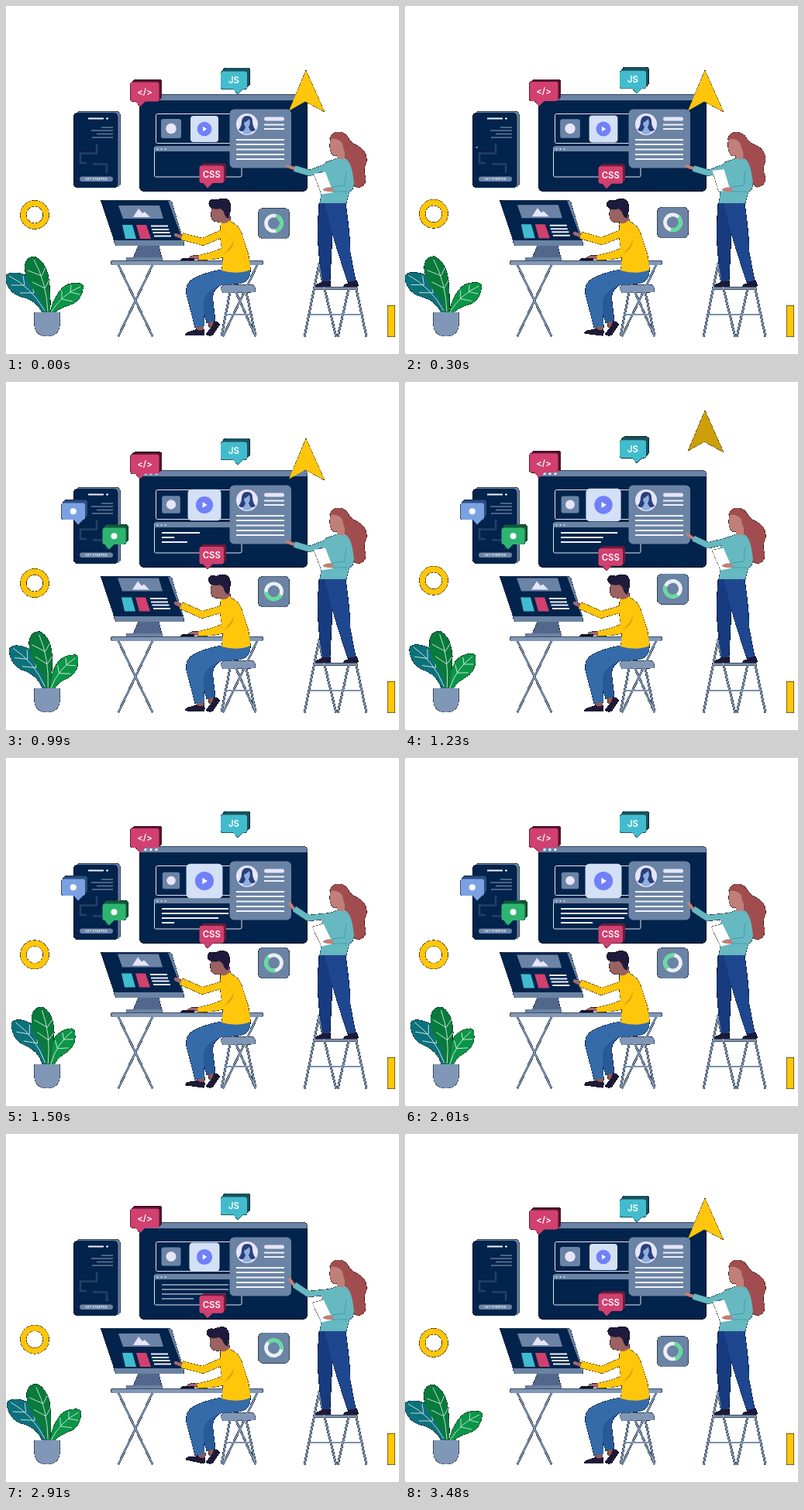
An HTML page for the animation above (3510 ms loop, 507x450 px).

```html
<!DOCTYPE html>
<html lang="en">
<head>
<meta charset="utf-8">
<title>Web design team</title>
<style>
  html, body { margin: 0; width: 100%; height: 100%; overflow: hidden; background: #fff; }
  svg { display: block; width: 507px; height: 450px; }
  path, line { stroke-linejoin: round; }
  text { font-family: Inter, "Open Sans", sans-serif; font-weight: 600; fill: #fff; text-anchor: middle; }
  .navy { fill: #02234b; } .slate { fill: #6b83a4; } .steel { fill: #8197b7; }
  .yellow { fill: #ffc60b; } .pale { fill: #e6e5fa; } .shoe { fill: #1e1839; }
  .bar { fill: none; stroke: #7c92b1; stroke-width: 2.2; }
  .thin { fill: none; stroke: #dfe6f4; stroke-width: 1; }
  .rows { fill: none; stroke: #f0f0fc; stroke-width: 2; }
  .vein { fill: none; stroke: #cfe9dc; stroke-width: .9; }
</style>
</head>
<body>
<svg viewBox="0 0 507 450">
  <defs>
    <!-- thin hard dark outline around every silhouette -->
    <filter id="edge" filterUnits="userSpaceOnUse" x="0" y="0" width="507" height="450" color-interpolation-filters="sRGB">
      <feGaussianBlur in="SourceAlpha" stdDeviation=".45"/>
      <feComponentTransfer result="matte"><feFuncA type="discrete" tableValues="0 1 1 1 1 1 1 1"/></feComponentTransfer>
      <feMerge><feMergeNode in="matte"/><feMergeNode in="SourceGraphic"/></feMerge>
    </filter>
  </defs>
  <g filter="url(#edge)">
    <!-- phone -->
    <rect class="slate" x="90" y="136.500" width="57.500" height="97.500" rx="5"/>
    <rect class="navy" x="87.500" y="138" width="57" height="97" rx="5"/>
    <path d="M106 145.500H126" class="rows"/><circle cx="130.500" cy="145.500" r="1.300" fill="#fff"/>
    <path d="M123 157H138M110 161H138M117 165.500H138M111 170H138" stroke="#60789a" stroke-width="1.600"/>
    <path d="M117 178V190.500H96V203H104M112 204.500H130V216" fill="none" stroke="#263f65" stroke-width="2.600"/>
    <rect class="slate" x="95" y="220.500" width="43" height="6.500" rx="3.200"/>
    <text x="116.500" y="225.300" font-size="3.900" letter-spacing=".15">GET STARTED</text>

    <!-- large screen -->
    <rect class="navy" x="172.500" y="114.500" width="216" height="125" rx="5"/>
    <path class="slate" d="M172.500 122V119Q172.500 114.500 177 114.500H384Q388.500 114.500 388.500 119V122Z"/>
    <g fill="#eef1fa"><circle cx="180" cy="118.500" r="1.700"/><circle cx="187" cy="118.500" r="1.700"/><circle cx="194" cy="118.500" r="1.700"/></g>
    <rect class="thin" x="193.500" y="139.500" width="110" height="38" rx="2"/>
    <rect class="thin" x="191.500" y="182" width="112.500" height="39" rx="2"/>
    <path class="slate" d="M191.500 188V184Q191.500 182 194 182H304V188Z"/>
    <g class="pale"><circle cx="195.500" cy="185" r="1"/><circle cx="200.500" cy="185" r="1"/><circle cx="205.500" cy="185" r="1"/></g>
    <path id="typing" class="rows"/>
    <g id="thumb"><rect class="slate" x="-13" y="-12.500" width="26" height="25" rx="3"/><circle class="pale" r="6.800"/></g>
    <g id="play">
      <rect x="-18" y="-17" width="36" height="34" rx="4" fill="#d3e0f5"/>
      <circle r="9.300" fill="#7080f8"/><path d="M-2-3.200L3 0L-2 3.200Z" fill="#fff"/>
    </g>
    <path id="cursor" class="yellow" d="M387 83L411 137L386 123.500L365 135.500Z"/>
    <rect class="slate" x="288.500" y="133.500" width="79.500" height="76" rx="6"/>
    <circle class="pale" cx="311" cy="153" r="14"/>
    <path d="M300 160Q304 156 304 149Q305 142 311 142Q318 142 318 149Q318 156 322 160Q318 164 314 161H308Q304 164 300 160Z" fill="#2c3f7c"/>
    <path d="M307 151Q311 149 314 146Q316 152 313 157L317 164Q311 168 305 164L309 157Q307 154 307 151Z" fill="#8db0dc"/>
    <path d="M335.500 146H356.500" stroke="#e6e5fa" stroke-width="5" stroke-linecap="round"/>
    <path class="rows" d="M333 153.500H359M333 159H359M297 173H359M297 179H359M297 185.500H359M297 192H359M297 198H359"/>

    <g id="bubbles"></g>

    <!-- floating ring and chart -->
    <circle id="ring" cx="37" cy="270" r="14.700" fill="none" stroke="#ffc60b" stroke-width="7.600"/>
    <g id="chart">
      <rect class="slate" x="325.500" y="261.500" width="40" height="39.500" rx="6"/>
      <g id="donut" fill="none" stroke-width="4.700">
        <circle r="10" stroke="#eceff7"/><path d="M2.600-9.660A10 10 0 0 1 2.600 9.660" stroke="#62dc9b"/>
      </g>
    </g>
    <rect class="yellow" x="492.500" y="387.500" width="9" height="40"/>

    <!-- plant -->
    <g id="leafL">
      <path d="M47 397Q40 382 24 377Q4 374-1 353Q-2 346 8 345Q29 344 40 361Q48 378 53 397Z" fill="#0c717c"/>
      <path class="vein" d="M50 394Q32 363 4 349M36 371L33 357M36 371L18 371M24 361L22 349M24 361L7 361"/>
    </g>
    <g id="leafR">
      <path d="M57 397Q60 378 73 364Q83 356 97 359Q101 361 99 367Q96 383 81 387Q67 391 62 398Z" fill="#0b9548"/>
      <path class="vein" d="M58 396Q72 373 96 363M72 379L72 368M72 379L86 382M83 370L84 361M83 370L95 373"/>
    </g>
    <g id="leafM">
      <path d="M52 397Q47 380 34 365Q25 353 24 338Q25 324 37 324Q49 329 54 346Q58 365 57 397Z" fill="#087a3c"/>
      <path class="vein" d="M54 395Q52 357 36 328M50 365L34 357M50 365L56 354M46 349L28 342M46 349L51 338"/>
    </g>
    <path class="steel" d="M36.500 396H69.500V412Q68 427 53 427Q38 427 36.500 412Z"/>

    <!-- desk and computer -->
    <path class="bar" d="M145 335L189 427M189 335L145 427M324 335L280 427M281 335L322 427"/>
    <rect class="steel" x="135.500" y="329.500" width="196" height="5.500" rx="2"/>
    <path d="M171 309H197L201 326H164Z" fill="#51688c"/>
    <rect class="slate" x="155" y="325" width="47" height="4" rx="1"/>
    <path class="slate" d="M125 251.500H211Q213 251.500 214 254L229.500 306V310H143Q141 310 140 306Z"/>
    <path class="navy" d="M122.500 251.500H209L228 303H139.500Z"/>
    <g id="page">
      <path class="slate" d="M145 258H198L203 275H151Z"/>
      <path class="pale" d="M164 273L171 262L176 268L179 266L186 273Z"/>
      <path d="M150 283H163L168 301H154Z" fill="#40bcd0"/>
      <path d="M168 283H181L187 301H173Z" fill="#d1406f"/>
      <path class="rows" d="M187 284.500H209M188 289H210M189.500 293H211.500M191 297.500H213"/>
    </g>

    <!-- seated man -->
    <path class="bar" d="M289 370L278 427M310 370L322 427M284 399H316"/>
    <path class="steel" d="M277 366Q277 360.500 284 360.500H318Q322.500 362 321.500 370L280 371Z"/>
    <path d="M261 407L267 406L270 414L262 416Z" fill="#8f5a55"/>
    <path class="shoe" d="M268 408Q275 408 275.500 412L267 425Q261 428 258 424L265 416Z"/>
    <path d="M312 343Q314 355 300 357L277 361Q265 368 267 381L270 407L259 410L248 374Q246 357 270 347Z" fill="#285a98"/>
    <g id="foot">
      <path d="M245 412H255V421H246Z" fill="#8f5a55"/>
      <path class="shoe" d="M246 418Q250 421 255 418Q257 422 255.500 426H231.500Q231 422 238 421Z"/>
    </g>
    <path d="M278 341Q249 346 237 356Q231 363 233 374L244 416L256 414L255 382Q257 369 276 361L302 359Q317 355 315 339Z" fill="#356ba9"/>
    <path id="manHand" fill="none" stroke="#a5676a" stroke-width="4.500" stroke-linecap="round"/>
    <path id="manArm" fill="none" stroke="#ffc60b" stroke-width="9"/>
    <path class="yellow" d="M277 282Q282 277 290 279Q300 283 304 294L313 322L315.500 341Q299 348 278 342Q281 328 279 315Q275 301 277 282Z"/>
    <path class="yellow" d="M246 323Q262 320 277 314L297 292L302 302Q296 320 284 324Q266 329 247 328.500Z"/>
    <path d="M295 301Q291 312 281 320Q292 317 295 301Z" fill="#d5a206"/>
    <path id="mouseHand" d="M233 326Q236 321 246 323V328H234Z" fill="#a5676a"/>
    <path d="M225 328.500L228 326H243V328.500Z" fill="#161532"/>
    <g id="manHead">
      <path d="M266 261Q263 270 266 276Q269 280 277 279L278 284Q284 287 290 281L288 261Z" fill="#9a6260"/>
      <path d="M262 254Q264 248 272 251Q281 247 287 251Q292 257 289 267L287 275Q282 273 281 266L277 262Q268 264 264 260Q261 257 262 254Z" fill="#1e1a3c"/>
      <path d="M277 280Q283 283 289 277L291 281Q285 287 277 285Z" class="yellow"/>
    </g>

    <!-- ladder and woman -->
    <path class="bar" d="M404 333L385 428M403 333L426 428M442 366L428 428M452 366L465 428M402 335H408M392 399H459"/>
    <path class="steel" d="M397.500 363.500H453L454 366.500H396.500Z"/>
    <path class="shoe" d="M399 363L400 360Q407 359 410 354H418L419 363ZM435 363Q436 360 441 359L443 354H451Q455 358 454 363Z"/>
    <path d="M404 254H428L421 296L418 356H408Q402 318 402 285Z" fill="#183b7f"/>
    <path d="M411 254H438Q444 296 444 318L451 355L441 357Q427 316 419 287Z" fill="#1e478f"/>
    <g id="womanHead">
      <path d="M422 165Q432 160 440 168Q445 178 454 181Q467 188 465 202Q460 212 464 222Q465 234 453 235Q445 231 447 219Q446 206 438 198Q430 187 425 172Z" fill="#a14d50"/>
      <path d="M419 171Q416 183 420 191Q423 195 427 193V202H437V186L434 170Z" fill="#c07f79"/>
      <path d="M417.500 172Q420 162 431 163Q441 168 440 178L441 194Q435 188 434 178Q429 170 417.500 172Z" fill="#a14d50"/>
    </g>
    <path id="womanHand" fill="none" stroke="#c07f79" stroke-width="4" stroke-linecap="round"/>
    <path id="womanArm" fill="none" stroke="#66b8c1" stroke-width="7.600"/>
    <path d="M413 202Q420 200 426 197Q431 199 438 197Q446 203 448 222Q451 237 443 240L439 255H405Q408 238 406 224Q407 210 413 202Z" fill="#66b8c1"/>
    <path id="paper" d="M397 217L412 214.500L422 241L407 243.500Z" fill="#fff"/>
    <path d="M409 237Q414 233 422 235V240Q415 241 409 238.500Z" fill="#c07f79"/>
    <path d="M421 234L437 232L439 214M421 240L441 240" fill="none" stroke="#479ca9" stroke-width="1"/>
  </g>
</svg>
<script>
const LOOP = 3510;
const el = id => document.getElementById(id);
const set = (id, name, value) => el(id).setAttribute(name, value);
const move = (id, transform) => set(id, 'transform', transform);
const clamp = v => Math.max(0, Math.min(1, v));
const ramp = (t, a, b) => { const x = clamp((t - a) / (b - a)); return x * x * (3 - 2 * x); };
const wave = (t, period) => (1 - Math.cos(2 * Math.PI * t / period)) / 2;
const blend = (a, b, k) => a.map((v, i) => v + (b[i] - v) * k);
const polyline = points => 'M' + points.join(' ');

// Speech bubble: dark offset slab, coloured face, downward tail
function bubble(id, x, y, w, h, tail, dx, dy, face, dark, content) {
  const box = (ox, oy, fill) =>
    `<rect x="${x + ox}" y="${y + oy}" width="${w}" height="${h}" rx="3" fill="${fill}"/>`;
  const mark = content
    ? `<text x="${x + w / 2}" y="${y + h / 2 + 4}" font-size="11.300">${content}</text>`
    : `<circle cx="${x + w / 2}" cy="${y + h / 2}" r="4" fill="#fff"/>`;
  return `<g id="${id}">${box(dx, dy, dark)}${box(dx / 2, dy / 2, dark)}${box(0, 0, face)}
    <path d="M${tail - 6} ${y + h - .5}H${tail + 7}L${tail} ${y + h + 6.5}Z" fill="${face}"/>${mark}</g>`;
}
el('bubbles').innerHTML =
  bubble('code', 160.5, 98.5, 37, 25, 173, 3.5, -3, '#d1406f', '#561231', '&lt;/&gt;') +
  bubble('js', 277, 84.5, 34, 23, 299, 3.5, -4.5, '#42bccd', '#1a525d', 'JS') +
  bubble('css', 249.5, 206.5, 31.5, 22.5, 260, 3, -3, '#d1406f', '#6d1c3d', 'CSS') +
  bubble('blue', 71.5, 156.5, 30.5, 21.5, 93, 3, -4, '#7aa2e3', '#2d4d82') +
  bubble('green', 124.5, 188.5, 30, 21.5, 133, 3, -4, '#2db570', '#125a3b');

// Scale a bubble around its tail tip
function pop(id, x, y, k, turn = 0) {
  move(id, `translate(${x} ${y}) rotate(${turn * (1 - k)}) scale(${k}) translate(${-x} ${-y})`);
}

function draw(t) {
  const s = wave(t, LOOP), tap = wave(t, LOOP / 3);

  move('code', `translate(0 ${-8 * s})`);
  move('js', `translate(0 ${-11.5 * s})`);
  move('css', `translate(0 ${11 * s})`);
  move('ring', `translate(0 ${-16.5 * s})`);
  move('chart', `translate(0 ${-17 * s})`);
  move('donut', `translate(345.500 281) rotate(${360 * t / LOOP})`);
  pop('blue', 93, 184, ramp(t, 250, 560) * (1 - ramp(t, 2160, 2490)));
  pop('green', 132, 215, ramp(t, 500, 790) * (1 - ramp(t, 2590, 2950)), -60);

  move('thumb', `translate(213 158.500) scale(${1 - .15 * s})`);
  move('play', `translate(256 159) scale(${1 + .32 * s})`);

  // [y, start, speed in px/ms, full width]
  const rows = [[195, 500, .1, 86], [201, 890, .16, 86], [207, 575, .079, 82], [213, 1340, .1, 41]];
  set('typing', 'd', rows.map(([y, start, speed, full]) =>
    `M201 ${y}h${Math.max(0, Math.min(full, (t - start) * speed))}`).join(''));
  set('typing', 'opacity', 1 - ramp(t, 2650, 3180));

  const flight = Math.max(0, t - 780);
  const gone = t > 2000;
  move('cursor', `translate(0 ${gone ? 0 : -Math.min(74, 2.27e-4 * flight * flight)})`);
  set('cursor', 'opacity', gone ? ramp(t, 3000, 3330) : 1 - ramp(t, 1180, 1360));

  move('leafL', `rotate(${10 * s} 51 397)`);
  move('leafM', `rotate(${9 * s} 54 397)`);
  move('leafR', `rotate(${-17 * s} 58 397)`);

  const swipe = ramp(t, 200, 560) * (1 - ramp(t, 1900, 2250));
  move('page', `translate(${-swipe} ${-4.5 * swipe})`);
  set('manArm', 'd', polyline(blend([227, 298, 254, 305, 284, 292], [226, 289, 253, 301, 284, 292], swipe)));
  set('manHand', 'd', polyline(blend([219, 296, 227, 299], [219, 286, 227, 290], swipe)));
  move('manHead', `rotate(${-6 * tap} 283 284)`);
  move('foot', `rotate(${13 * tap} 254 425)`);
  move('mouseHand', `translate(${3 - 3 * tap} 0)`);

  const raise = ramp(t, 1050, 1400) * (1 - ramp(t, 2960, 3320));
  const look = ramp(t, 200, 540) * (1 - ramp(t, 640, 970));
  set('womanArm', 'd', polyline(blend([372, 210, 392, 216, 420, 205], [372, 195, 390, 207, 420, 204], raise)));
  set('womanHand', 'd', polyline(blend([363, 207, 372, 210], [366, 188, 372, 196], raise)));
  move('womanHead', `rotate(${-11 * look} 433 206)`);
  move('paper', `translate(${-7 * look - raise} ${-16 * look}) rotate(${20 * look - 5 * raise} 410 230)`);
}

function tick(now) {
  draw(now % LOOP);
  requestAnimationFrame(tick);
}
draw(0);
requestAnimationFrame(tick);
</script>
</body>
</html>
```
